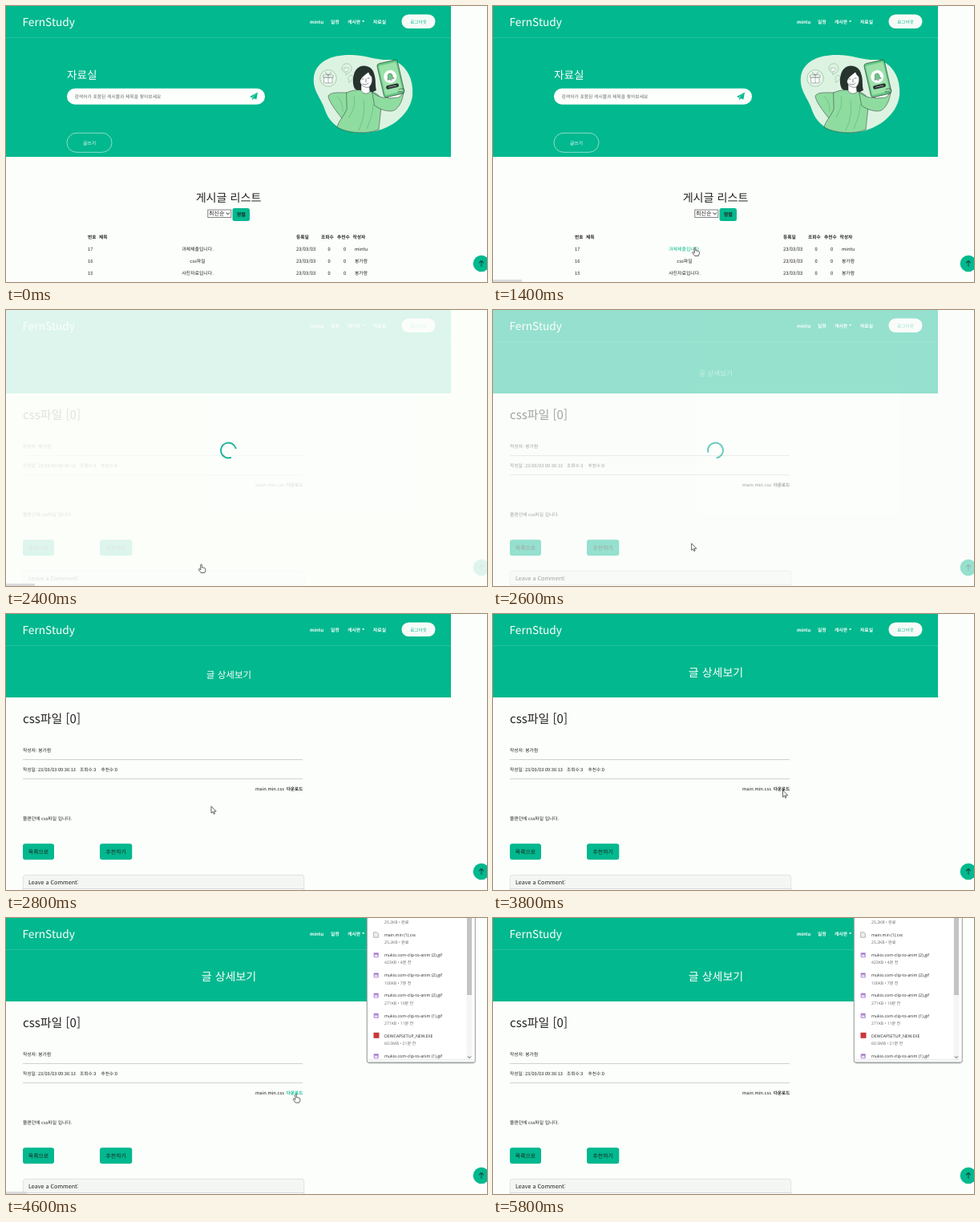
Recreate the animation shown at these times as an HTML page. Size 600 by 344 pixels, loop 6800 ms.

```html
<!DOCTYPE html>
<html lang="ko">
<head>
<meta charset="utf-8">
<title>자료실</title>
<style>
html, body { margin: 0; width: 100%; height: 100%; overflow: hidden; background: #fcfefb; }
svg { display: block; width: 100vw; height: 100vh; }
text { font-family: "Noto Sans CJK KR", "Noto Sans", sans-serif; fill: #222; white-space: pre; text-rendering: geometricPrecision; }
.w { fill: #fff; }
.g { fill: #02b88e; }
.b { font-weight: 700; }
.h { font-weight: 500; }
.m { text-anchor: middle; }
.ph { fill: #666; }
.ui { font-family: "Open Sans", "Noto Sans CJK KR", sans-serif; }
.sub { fill: #666; }
.hot { fill: #02b88e; }
</style>
</head>
<body>
<svg id="stage" viewBox="0 0 600 344"></svg>
<script>
const LOOP = 6800, GREEN = '#02b88e', PAGE = '#fcfefb';
const stage = document.getElementById('stage');
const text = (x, y, size, str, cls = '', id = '') =>
  `<text x="${x}" y="${y}" font-size="${size}" class="${cls}" id="${id}">${str}</text>`;
const rect = (x, y, w, h, fill, extra = '') =>
  `<rect x="${x}" y="${y}" width="${w}" height="${h}" fill="${fill}" ${extra}/>`;
const path = (d, fill = 'none', stroke = 'none', width = 1) =>
  `<path d="${d}" fill="${fill}" stroke="${stroke}" stroke-width="${width}" stroke-linecap="round" stroke-linejoin="round"/>`;

const header = height =>
  rect(0, 0, 555, height, GREEN) + rect(0, 39, 555, 1, '#fff', 'opacity=".13"') +
  text(20.5, 25, 13.7, 'FernStudy', 'w h') +
  text(379, 21.5, 5.8, 'mintu', 'w b') + text(405, 21.5, 5.8, '일정', 'w b') +
  text(426, 21.5, 5.8, '게시판', 'w b') + path('M444 18.3h3.4l-1.7 1.9z', '#fff') +
  text(458, 21.5, 5.8, '자료실', 'w b') +
  rect(493.5, 10.5, 42, 17.5, '#f6fbf8', 'rx="8.75"') + text(514.5, 21.5, 5.6, '로그아웃', 'g m');

const INK = '#27332f', LEAF = '#8fdca0', PALE = '#dcf3e1';
const picture =
  path('M384 88C387 68 408 60 432 61C452 62 462 68 480 67C500 72 509 92 507 112C504 136 478 157 446 158C418 158 404 147 398 130C393 114 382 106 384 88Z', PALE) +
  path('M419 78a6 6 0 1 1 9 5l-4 3v-3a6 6 0 0 1-5-5M427 90c1-5 6-5 6 0-1 3-4 4-5 5z', PALE, '#8fb79d', .6) +
  path('M424.5 82l-2.6-2.6c-1.2-2 1.6-3.2 2.6-1.2 1-2 3.8-.8 2.6 1.2z', '#fff', '#718c7d', .5) +
  `<circle cx="402" cy="90" r="10.3" fill="#e7f7e9" stroke="#8fb79d" stroke-width=".7"/>` +
  path('M397 89h10v7h-10zM396 86h12v3h-12zM402 86v10M402 86c-6-1-4-6 0 0 4-6 6-1 0 0', '#fff', '#718c7d', .6) +
  path('M435 103C431 96 433 82 438 78C445 71 457 75 459 84C462 92 460 98 462 105L448 112Z', INK) +
  path('M425 108C415 108 405 107 402 112C402 118 411 130 419 140L430 146L436 118Z', LEAF, INK, .5) +
  path('M425 108C433 104 442 104 450 106C460 107 465 110 469 117L465 154C452 160 426 159 413 151C415 143 421 138 425 129Z', LEAF, INK, .5) +
  path('M457 108C466 114 473 116 478 113L485 102L496 106C495 120 488 131 480 131C472 131 465 128 460 124Z', LEAF, INK, .5) +
  path('M413 113c5 4 7 10 7 18M434 113c2 9 0 15-6 26M446 118c2 12 0 24-6 37M458 123c0 9-3 18-8 30', 'none', '#55a66c', .5) +
  path('M443 98v8c3 4 8 4 11 1l-1-8z', '#fff', INK, .5) +
  path('M440 87C442 83 448 85 453 82C458 88 458 96 453 101C447 103 440 98 440 87Z', '#fff', INK, .5) +
  path('M437 96C437 85 443 80 451 79C455 80 458 84 458 89C454 87 453 85 452 82C448 87 441 88 441 100Z', INK) +
  path('M444 91h2M451 90h2M449 91v4M445 97c3 2 5 1 7-1', 'none', INK, .6) +
  path('M474 108C475 103 482 105 489 105C497 107 494 112 489 114L477 115Z', '#fff', INK, .5) +
  `<g transform="rotate(-13 480 91)">` +
  rect(467, 69, 26, 43, '#67c985', `rx="3" stroke="${INK}" stroke-width=".6"`) +
  rect(469, 72, 22, 37, '#9be2aa', 'rx="1.5"') +
  `<circle cx="480" cy="88" r="8" fill="#fff"/>` +
  path('M476 91c2-2 0-7 4-7s2 5 4 7zM479 92.5h2', '#67c985', INK, .4) +
  rect(472, 98, 16, 4.6, INK, 'rx="2"') + rect(475, 100, 10, .7, '#fff') + `</g>` +
  path('M490 104c3-2 6-1 7 1M489 107c4-1 6 0 7 2', 'none', INK, .6);

const rows = [[17, '과제제출입니다.', 'mintu'], [16, 'css파일', '봉가람'], [15, '사진자료입니다.', '봉가람']];
const listPage = header(188) + picture +
  text(76, 91, 13.6, '자료실', 'w h') +
  rect(76, 102.8, 247, 20, '#fdfffd', 'rx="10"') +
  text(85.5, 115, 5.8, '검색어가 포함된 게시물과 제목을 찾아보세요', 'ph') +
  path('M314 107.5L304 113l2.6 1.2zM314 107.5l-1.6 9-3.4-1.5zM314 107.5l-6.8 7v3l1.7-2.2z', GREEN) +
  rect(76, 158.3, 56, 24, 'none', 'rx="12" stroke="#c4eee1" stroke-width=".7"') +
  text(104, 172.5, 5.8, '글쓰기', 'w m') +
  text(277.5, 243.5, 14.1, '게시글 리스트', 'm h') +
  rect(251.8, 254, 29, 9.5, '#fff', 'stroke="#666" stroke-width=".8"') +
  text(253, 261.4, 7, '최신순') + path('M275 257.8l1.8 2 1.8-2', 'none', '#222', 1) +
  rect(282.5, 252, 21.5, 16, GREEN, 'rx="2.5"') + text(293.2, 262.2, 6, '정렬', 'm b') +
  [[102, '번호'], [116, '제목'], [362, '등록일'], [393, '조회수'], [413, '추천수'], [432.5, '작성자']]
    .map(([x, s]) => text(x, 289.5, 5.7, s, 'b')).join('') +
  rows.map(([n, title, who], i) => {
    const y = 305 + i * 15;
    return text(102, y, 5.7, n) + text(239, y, 5.9, title, 'm', 'row' + i) + text(362, y, 5.9, '23/03/03') +
      text(403, y, 5.7, 0, 'm') + text(422.5, y, 5.7, 0, 'm') + text(435, y, 5.8, who);
  }).join('');

const detailPage = header(104) +
  `<g id="heading">${text(278, 77.5, 14, '글 상세보기', 'w m h')}</g>` +
  text(21, 136, 15, 'css파일 [0]') +
  text(21, 171.5, 5.8, '작성자: 봉가람') + rect(21, 181, 349, .8, '#c4c8c5') +
  text(21, 195.5, 5.7, '작성일: 23/03/03 09:36:13') + text(92, 195.5, 5.7, '조회수:3') +
  text(118.5, 195.5, 5.7, '추천수:0') + rect(21, 205, 349, .8, '#c4c8c5') +
  text(311, 219.5, 5.8, 'main.min.css') + text(350, 219.5, 5.5, '다운로드', 'b', 'download') +
  text(21, 256.5, 5.8, '플랜던에 css파일 입니다.') +
  rect(21, 286.3, 39, 20, GREEN, 'rx="3"') + text(40.5, 298.8, 6.9, '목록으로', 'm') +
  rect(117, 286.3, 40.3, 20, GREEN, 'rx="3"') + text(137.2, 298.8, 6.9, '추천하기', 'm') +
  rect(21.3, 325.3, 350.4, 30, PAGE, 'rx="3" stroke="#cfd3d0" stroke-width=".8"') +
  rect(21.7, 325.7, 349.6, 17, '#f4f6f4', 'rx="2.5"') + rect(21.7, 342, 349.6, .8, '#cfd3d0') +
  text(28, 337, 7.2, 'Leave a Comment:');

const clip = n => `mukio.com-clip-to-anim (${n}).gif`;
const files = [['', '25.2KB • 완료'], ['main.min (1).css', '25.2KB • 완료'], [clip(2), '423KB • 4분 전'],
  [clip(2), '100KB • 7분 전'], [clip(2), '271KB • 10분 전'], [clip(1), '271KB • 11분 전'],
  ['DEWCAPSETUP_NEW.EXE', '60.5MB • 21분 전'], [clip(1), '']];
const icon = (name, y) => {
  if (name.endsWith('EXE')) return rect(458.5, y - 6, 7, 7, '#c9373a');
  if (name.endsWith('css')) return path(`M459 ${y - 5}h3.6l1.8 1.8v4.6h-5.4z`, '#eee', '#999', .7);
  return name && rect(458.5, y - 5, 6.5, 6.3, '#c3a5df', 'rx="1"') +
    path(`M459.5 ${y}l2-2.4 2.5 2.4z`, '#f6efff') + rect(459.4, y - 4, 4.6, .8, '#8f62b8');
};
const panel =
  rect(450.3, -8, 135, 188.6, '#fff', 'rx="3" stroke="#9aa19d" stroke-width="1.1"') +
  rect(451, 178.7, 133.6, 1.3, '#d4d7d5') + rect(452, 176.4, 130, .7, '#ddd') +
  rect(574.5, 0, 7, 176, '#f5f5f5') + rect(575, 0, 6, 96, '#c3c3c3') +
  path('M576.3 172.7l1.7 1.8 1.7-1.8', 'none', '#444', .9) +
  files.map(([name, note], i) => {
    const y = -2.4 + i * 25.2;
    return icon(name, y) + text(472, y, 5.2, name, 'ui') + text(472, y + 9.4, 5.1, note, 'ui sub');
  }).join('');

stage.innerHTML =
  rect(0, 0, 600, 344, PAGE) + `<g id="list">${listPage}</g><g id="detail">${detailPage}</g>` +
  `<circle cx="593" cy="321" r="10.3" fill="${GREEN}"/>` + path('M593 324.5v-7M590.5 320l2.5-2.6 2.5 2.6', 'none', '#164d40', 1.1) +
  `<g id="loader">${rect(0, 0, 600, 344, PAGE)}<g id="spinner">` +
  path('M284.2 181.7A9.5 9.5 0 1 1 284.2 168.3', 'none', '#02a990', 2) + `</g></g>` +
  `<g id="panel">${panel}</g>` +
  `<g id="status">${rect(0, 341, 36, 4, '#d9dcda', 'id="bar"')}</g>` +
  `<g id="arrow">${path('M0 0V8.2L1.9 6.5L3.2 9.3L4.5 8.7L3.2 6H5.8Z', '#fff', '#222', .7)}</g>` +
  `<g id="hand">${path('M-.9.8C-.9-.4.9-.4.9.8V4L2.6 4.2 4.4 4.7 5.4 5.5V7.5L4.3 10.5H-.3L-3.2 6.6C-3.4 5.4-2.2 5-.9 6.6Z', '#fff', '#222', .7)}</g>`;

const el = id => document.getElementById(id);
const show = (id, on) => el(id).style.display = on ? '' : 'none';
const hot = (id, on) => el(id).classList.toggle('hot', on);
const between = (t, a, b) => t >= a && t < b;

// time, x, y of the pointer tip
const track = [[800, 174, 168], [900, 254, 276], [1100, 256, 285], [1200, 252, 301], [1500, 252, 301],
  [1800, 243.5, 317], [2500, 243.5, 317], [2800, 256, 240], [3200, 256, 240], [3800, 361.5, 220],
  [5000, 361.5, 219.5], [5600, 342, 146], [5700, 376, 118]];
function pointer(t) {
  const i = track.findIndex(k => k[0] > t);
  if (i <= 0) return track[i ? track.length - 1 : 0].slice(1);
  const [a, b] = [track[i - 1], track[i]], u = (t - a[0]) / (b[0] - a[0]);
  return [a[1] + (b[1] - a[1]) * u, a[2] + (b[2] - a[2]) * u];
}

function draw(now) {
  const t = Math.floor(now % LOOP / 100) * 100;
  show('list', t < 2400);
  show('detail', t >= 2400);

  const u = Math.min(1, Math.max(0, (t - 2400) / 1000));
  const scale = .3 + .7 * (1 - (1 - u) ** 2.7);
  el('heading').setAttribute('transform', `translate(278 89) scale(${scale}) translate(-278 -89)`);
  el('heading').setAttribute('opacity', Math.min(1, u * 2.5));

  const fade = t < 2600 ? .88 : .88 * (2800 - t) / 300;
  show('loader', between(t, 2400, 2800));
  el('loader').setAttribute('opacity', Math.max(0, fade));
  el('spinner').setAttribute('transform', `rotate(${28 + (t - 2400) * .48} 277.5 175)`);

  show('panel', t >= 4400);
  show('status', between(t, 1400, 2600) || between(t, 4000, 5100));
  el('bar').setAttribute('width', t < 4000 ? 36 : 26);
  hot('row0', between(t, 1400, 1700));
  hot('row1', between(t, 1700, 2400));
  hot('download', between(t, 4000, 5000));

  const hand = between(t, 1400, 2600) || between(t, 4000, 5000);
  const at = `translate(${pointer(t)})`;
  show('hand', hand);
  show('arrow', !hand && between(t, 800, 5800));
  el('hand').setAttribute('transform', at);
  el('arrow').setAttribute('transform', at);
}

const start = performance.now();
(function tick() {
  draw(performance.now() - start);
  requestAnimationFrame(tick);
})();
</script>
</body>
</html>
```
